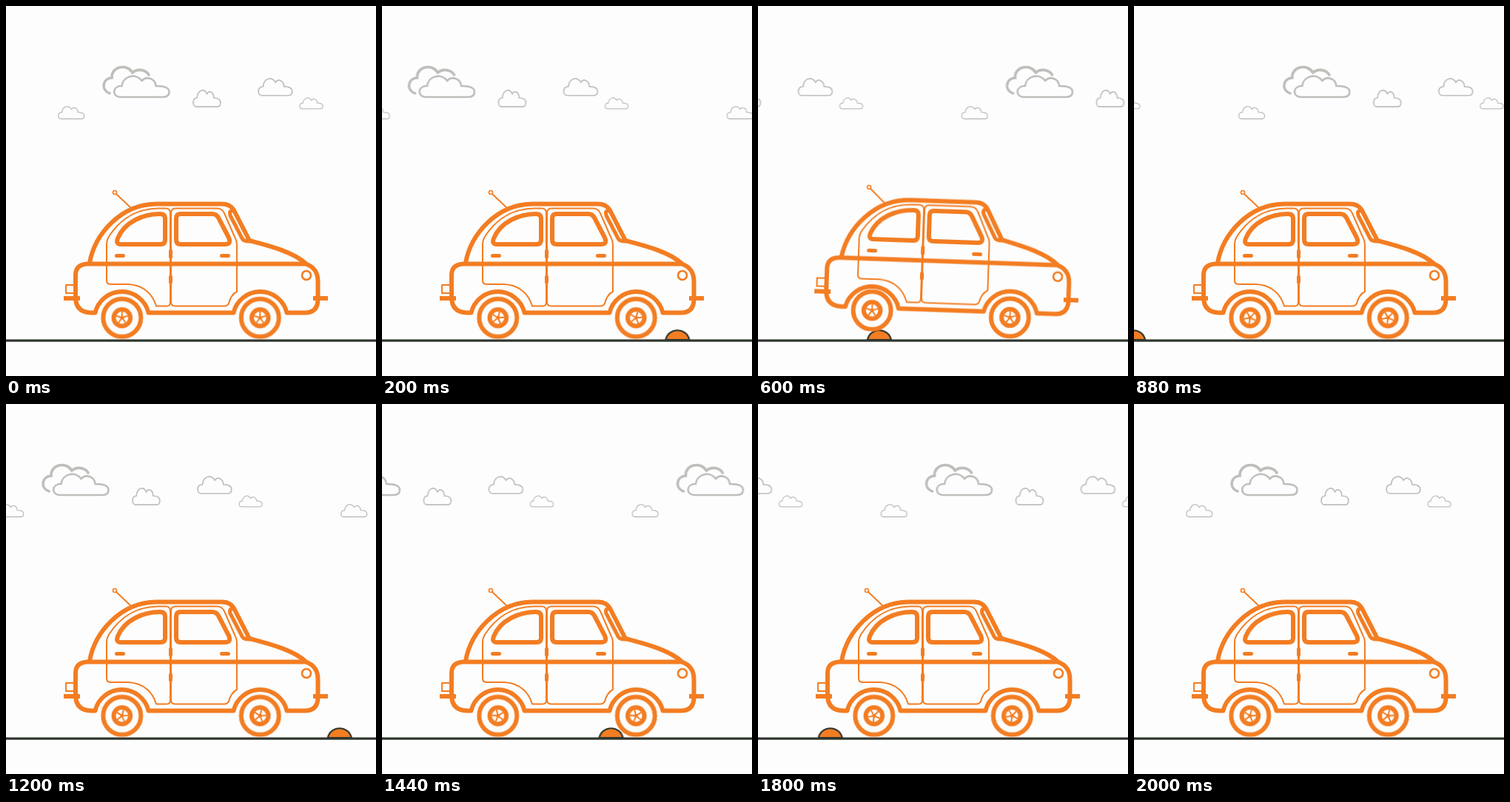
Animation, 500 px wide and 500 px high, one loop 2.04 s. Source, as an HTML page:

```html
<!DOCTYPE html>
<html lang="en">
<head>
<meta charset="utf-8">
<title>Car on a bumpy road</title>
<style>
  :root { --paper: #fdfdfd; --orange: #f37d22; --dark: #30372f; --grey: #bebebb; }
  html, body { margin: 0; width: 100%; height: 100%; overflow: hidden; background: var(--paper); }
  svg { display: block; width: 100vw; height: 100vh; }

  /* 51 drawings of 40 ms each; the small delay keeps steps clear of the boundaries */
  .sky, .bumps, .spin { animation: 2040ms steps(51, jump-none) -1ms infinite; }
  .sky { animation-name: drift; }
  .bumps { animation-name: pass; }
  .spin { animation-name: spin; }
  .car, .rear, .front { animation: 2040ms step-end -1ms infinite; }
  .car { animation-name: ride; transform-origin: 263px 340px; }
  .rear { animation-name: rear-hop; }
  .front { animation-name: front-hop; }

  @keyframes drift { to { transform: translateX(-955px); } }
  @keyframes pass { to { transform: translateX(-1177px); } }
  @keyframes spin { to { transform: rotate(2160deg); } }

  /* nose rises first, then the tail; two bumps per loop */
  @keyframes ride {
    0%, 17.647%, 33.333%, 70.588%, 86.275%, 100% { transform: none; }
    11.765%, 15.686%, 64.706%, 68.627% { transform: translateY(-1.6px) rotate(-1deg); }
    13.725%, 66.667% { transform: translateY(-3.2px) rotate(-2deg); }
    27.451%, 31.373%, 80.392%, 84.314% { transform: translateY(-1.6px) rotate(1deg); }
    29.412%, 82.353% { transform: translateY(-3.2px) rotate(2deg); }
  }
  @keyframes front-hop {
    0%, 17.647%, 70.588%, 100% { transform: none; }
    11.765%, 15.686%, 64.706%, 68.627% { transform: translateY(-1.5px); }
    13.725%, 66.667% { transform: translateY(-3px); }
  }
  @keyframes rear-hop {
    0%, 33.333%, 86.275%, 100% { transform: none; }
    27.451%, 31.373%, 80.392%, 84.314% { transform: translateY(-1.5px); }
    29.412%, 82.353% { transform: translateY(-3px); }
  }

  .sky { fill: none; stroke: var(--grey); stroke-linecap: round; }
  #cloud { vector-effect: non-scaling-stroke; }
  .car { fill: none; stroke: var(--orange); stroke-width: 6; stroke-linecap: round; stroke-linejoin: round; }
  .thin { stroke-width: 2; }
  .solid { fill: var(--orange); stroke: none; }
  .tyre, .cap { fill: var(--paper); }
  .cap { stroke-width: 6; }
  .road { stroke: var(--dark); stroke-width: 3.2; }
  #bump { fill: var(--orange); stroke: var(--dark); stroke-width: 2.2; stroke-linejoin: round; }
</style>
</head>
<body>
<svg viewBox="0 0 500 500">
  <defs>
    <path id="cloud" d="M8 28C-2.500 27 -2 13 11 13A15 15 0 0 1 38 6A11 11 0 0 1 57 13Q75 13 75 21Q75 28 67 28Z"/>
    <g id="clouds">
      <path stroke-width="3.6" d="M140 118C128 114 130 98 143 97C142 82 163 77 171 90C178 84 189 86 193 93"/>
      <use href="#cloud" stroke-width="2.6" transform="translate(145.500 95)"/>
      <use href="#cloud" stroke-width="1.7" transform="translate(252.700 114) scale(.495 .79)"/>
      <use href="#cloud" stroke-width="1.7" transform="translate(340.700 98.300) scale(.615 .81)"/>
      <use href="#cloud" stroke-width="1.2" transform="translate(396.700 124.300) scale(.42 .52)"/>
      <use href="#cloud" stroke-width="1.3" transform="translate(70.500 136) scale(.47 .59)"/>
    </g>
    <path id="bump" d="M-16 451C-12 434 12 434 16 451Z"/>
    <g id="wheel">
      <circle class="tyre" r="25.500"/>
      <circle class="cap" r="11.300"/>
      <g class="spin">
        <path class="thin" d="M0 0V-8M0 0L7.600 -2.500M0 0L4.700 6.500M0 0L-4.700 6.500M0 0L-7.600 -2.500"/>
        <circle class="solid" r="2.500"/>
      </g>
    </g>
  </defs>

  <g class="sky">
    <use href="#clouds"/>
    <use href="#clouds" x="491"/>
    <use href="#clouds" x="955"/>
  </g>

  <g class="bumps">
    <use href="#bump" x="517"/>
    <use href="#bump" x="1157"/>
  </g>
  <path class="road" d="M0 452.200H500"/>

  <g class="car">
    <!-- doors, hinges and handles -->
    <g class="thin">
      <path d="M136 322Q136 316 140 310C150 295 170 274 205 273.500H216Q222 273.500 222 280V400Q222 405.500 217 405.500H203C199 391 187 377 165 376H142Q136 376 136 371Z"/>
      <path d="M223 280Q223 273.500 229 273.500H285Q292 273.500 295 280L309 312Q312 317 312 322V386Q304 390 301 402Q299 405.500 295 405.500H229Q223 405.500 223 400Z"/>
      <path d="M149 254L170 274"/>
      <circle cx="147" cy="252" r="2.500" stroke-width="1.600"/>
      <path d="M91 377H81V388H91"/>
      <circle cx="406" cy="364" r="6" stroke-width="2.600"/>
    </g>
    <path stroke-width="5" d="M149.500 337.500H158.500M291.500 337.500H300.500M222.500 331V339M222.500 366V373"/>

    <!-- windows -->
    <path d="M151 314C160 292 185 281 208 281Q215 281 215 287V316Q215 322 209 322H155Q148 322 151 314Z"/>
    <path d="M236 281H279Q284 281 287 286L301 313Q305 322 296 322H236Q230 322 230 316V287Q230 281 236 281Z"/>
    <path stroke-width="5" d="M307 277Q301 276 303 283L319 314Q321 318 329 318"/>

    <!-- shell -->
    <path d="M113 347C120 308 155 268 203 267.500H292Q303 267.500 308 276L329 317C355 324 388 332 405 348"/>
    <path d="M120 414.500H115Q94 414 94 393V364Q94 349 110 348.500H405Q421.500 354 421.500 372V396Q421.500 414.500 404 414.500H379.500A37 37 0 0 0 307.500 414.500H192.500A37 37 0 0 0 120.500 414.500Z"/>
    <path class="solid" d="M78 392H100V398H78ZM415 392H435V398H415Z"/>

    <g class="rear"><use href="#wheel" x="156.800" y="421.300"/></g>
    <g class="front"><use href="#wheel" x="343.300" y="421.300"/></g>
  </g>
</svg>
</body>
</html>
```
